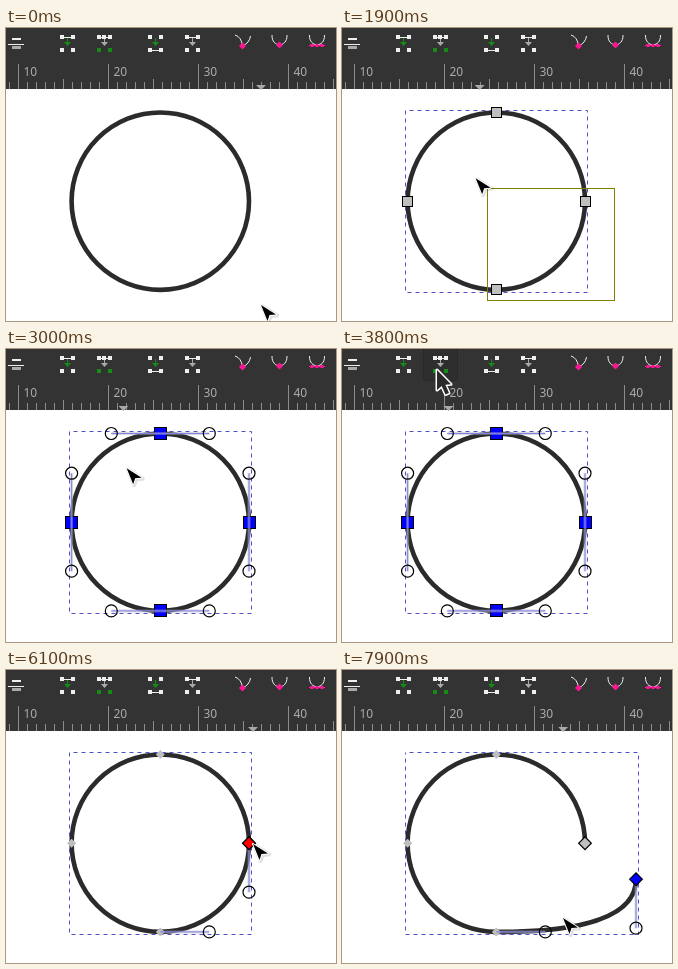
Write an HTML page with a canvas that moves like this. It is 330 px wide and 293 px high and loops after 8 s.

```html
<!DOCTYPE html>
<html lang="en">
<head>
<meta charset="utf-8">
<title>Breaking a path at a node</title>
<style>
html, body { margin: 0; width: 330px; height: 293px; overflow: hidden; background: #fff; }
canvas { display: block; }
</style>
</head>
<body>
<canvas id="stage" width="330" height="293"></canvas>
<script>
const ctx = document.getElementById('stage').getContext('2d');
const LOOP = 8000, STEP = 100, BAR = 61;
const CX = 154.3, CY = 173.2, R = 88.7, H = R * 0.5523;
const INK = '#2b2b2b', GREY = '#bfbfbf', BLUE = '#0000ff', RED = '#ff0000';
const GREEN = '#168c16', PINK = '#ff1493', PALE = '#eeeeee', DIM = '#aaaaaa';

// When each thing happens, in ms
const SELECT = 600, SHOW_NODES = 1100, BAND = 1500, BAND_END = 2800;
const BREAK = 4100, DESELECT = 5000, HOVER = 5500, GRAB = 6000, DRAG = 6200, DROP = 6900;

// Eased pointer moves: [from ms, to ms, x, y]
const HOME = [255, 277];
const moves = [
  [200, 700, 222, 231],
  [1000, 1400, 273, 272],
  [1400, 2300, 34, 63],
  [2500, 2600, 27, 66],
  [2700, 3100, 138, 129],
  [3100, 3800, 95, 20],
  [BREAK, DESELECT, 282, 155],
  [5200, HOVER, 247, 174],
  [DRAG, 6800, 298, 206],
  [6800, DROP, 298, 210],
  [DROP, 7100, 250, 185],
  [7500, 7900, 221, 248]
];

function pointerAt(t) {
  let [x, y] = HOME;
  for (const [from, to, nx, ny] of moves) {
    const k = Math.min(1, Math.max(0, (t - from) / (to - from)));
    const ease = k * k * (3 - 2 * k);
    x += (nx - x) * ease;
    y += (ny - y) * ease;
  }
  return [x, y];
}

// The loose end of the path follows the pointer while it is dragged.
function looseEnd(t) {
  const [x0, y0] = pointerAt(DRAG);
  const [x, y] = pointerAt(Math.min(DROP, Math.max(DRAG, t)));
  return [CX + R + x - x0, CY + y - y0];
}

function box(x, y, w, h, color) {
  ctx.fillStyle = color;
  ctx.fillRect(x, y, w, h);
}

function polygon(points, x, y, fill, stroke, width = 1) {
  ctx.beginPath();
  points.forEach(([px, py]) => ctx.lineTo(x + px, y + py));
  ctx.closePath();
  if (stroke) {
    ctx.strokeStyle = stroke;
    ctx.lineWidth = width;
    ctx.stroke();
  }
  if (fill) {
    ctx.fillStyle = fill;
    ctx.fill();
  }
}

function diamond(x, y, r, fill, stroke, width) {
  polygon([[0, -r], [r, 0], [0, r], [-r, 0]], x, y, fill, stroke, width);
}

function line(x0, y0, x1, y1, color, width) {
  ctx.strokeStyle = color;
  ctx.lineWidth = width;
  ctx.beginPath();
  ctx.moveTo(x0, y0);
  ctx.lineTo(x1, y1);
  ctx.stroke();
}

function squarePair(x, y, color, joined) {
  box(x - 7, y, 4, 4, color);
  box(x + 4, y, 4, 4, color);
  if (joined) box(x - 7, y + 2, 15, 1, color);
}

function pairIcon(x, bottom, arrow, topJoined, bottomJoined) {
  squarePair(x, 7, PALE, topJoined);
  squarePair(x, 20, bottom, bottomJoined);
  box(x, 10, 1, 5, arrow);
  polygon([[-3, 0], [4, 0], [0.5, 4]], x, 14, arrow);
}

function cupIcon(x, pointed) {
  ctx.strokeStyle = PALE;
  ctx.lineWidth = 1;
  ctx.beginPath();
  ctx.moveTo(x - 7.5, 7);
  if (pointed) {
    ctx.quadraticCurveTo(x - 1, 9, x, 18);
    ctx.quadraticCurveTo(x + 7, 15, x + 8, 8);
  } else {
    ctx.bezierCurveTo(x - 8, 20, x + 8, 20, x + 7.5, 7);
  }
  ctx.stroke();
}

function drawIcons() {
  box(6, 10, 9, 2, PALE);
  box(2, 16, 16, 1, PALE);
  box(6, 18, 9, 3, DIM);

  pairIcon(61, PALE, GREEN, true, false);
  pairIcon(98, GREEN, DIM, true, false);
  box(96, 7, 4, 4, PALE);
  pairIcon(149, PALE, GREEN, false, true);
  pairIcon(186, PALE, DIM, true, false);

  cupIcon(236.5, true);
  diamond(236.5, 18, 3.5, PINK);
  cupIcon(273.5);
  diamond(273.5, 17, 3.5, PINK);
  cupIcon(311);
  box(303, 17, 16, 1, PINK);
  for (let i = -1; i <= 1; i++) box(309.5 + i * 5, 16, 3, 3, PINK);
}

function drawRuler(markerX) {
  ctx.font = '12px "Noto Sans", sans-serif';
  for (let i = -1; i < 36; i++) {
    const x = 12 + i * 9;
    const top = i % 10 === 0 ? 36 : i % 5 === 0 ? 51 : 54;
    box(x, top, 1, BAR - top, '#8c8c8c');
    if (i % 10 === 0) {
      ctx.fillStyle = '#acacac';
      ctx.fillText(String(10 + i), x + 5.5, 48);
    }
  }
  polygon([[-5, 0], [5, 0], [0, 5]], markerX, 57, '#a8a8a8');
}

function drawToolbar(overBar, markerX) {
  box(0, 0, 330, BAR, '#333333');
  if (overBar) {
    ctx.beginPath();
    ctx.roundRect(81.5, -3.5, 34, 35, 3);
    ctx.fillStyle = '#2e2e2e';
    ctx.fill();
    ctx.strokeStyle = '#282828';
    ctx.lineWidth = 1;
    ctx.stroke();
  }
  drawIcons();
  drawRuler(markerX);
}

function drawPath([ex, ey]) {
  ctx.strokeStyle = INK;
  ctx.lineWidth = 4.6;
  ctx.beginPath();
  ctx.arc(CX, CY, R, 0, Math.PI / 2, true);
  ctx.bezierCurveTo(CX + H, CY + R, ex, ey + H, ex, ey);
  ctx.stroke();
}

function drawBounds(endX) {
  ctx.strokeStyle = '#5050c8';
  ctx.lineWidth = 1;
  ctx.setLineDash([4, 4]);
  ctx.lineDashOffset = 4;
  const right = Math.round(endX + 2) + 0.5;
  ctx.strokeRect(63.5, 82.5, right - 63.5, 182);
  ctx.setLineDash([]);
}

function squareNode(x, y, fill) {
  const r = fill === BLUE ? 6 : 5;
  const left = Math.floor(x) - r, top = Math.floor(y) - r;
  box(left, top, 2 * r + 1, 2 * r + 1, '#000');
  box(left + 1, top + 1, 2 * r - 1, 2 * r - 1, fill);
}

function diamondNode(x, y, fill, outlined) {
  diamond(x, y, outlined ? 5.5 : 4.5, fill, outlined && '#000', 2.4);
}

function handle(x, y, hx, hy) {
  line(x, y, hx, hy, 'rgba(170,170,170,.45)', 3);
  line(x, y, hx, hy, '#8080f0', 1);
  ctx.strokeStyle = '#000';
  ctx.lineWidth = 1.2;
  ctx.beginPath();
  ctx.arc(hx, hy, 6, 0, 7);
  ctx.stroke();
}

function drawNodes(t, [ex, ey]) {
  const selected = t >= BAND_END && t < DESELECT;
  const fill = selected ? BLUE : GREY;
  for (let i = 0; i < 4; i++) {
    const c = Math.round(Math.cos(i * Math.PI / 2)), s = Math.round(Math.sin(i * Math.PI / 2));
    const x = CX + R * c, y = CY + R * s;
    if (t < BREAK) squareNode(x, y, fill);
    else diamondNode(x, y, fill, selected || (i === 0 && t >= HOVER));
    if (selected) {
      handle(x, y, x + H * s, y + H * c);
      handle(x, y, x - H * s, y - H * c);
    }
  }
  if (t >= GRAB) {
    handle(CX, CY + R, CX + H, CY + R);
    handle(ex, ey, ex, ey + H);
  }
  if (t >= HOVER) diamondNode(ex, ey, t <= DROP ? RED : BLUE, true);
}

function drawRubberband(t) {
  const [x, y] = pointerAt(t - 28).map(Math.round);
  ctx.strokeStyle = '#808000';
  ctx.lineWidth = 1;
  ctx.strokeRect(x + 0.5, y + 0.5, 272 - x, 272 - y);
}

function drawPointer(x, y, overBar) {
  ctx.lineJoin = 'round';
  if (overBar) {
    const arrow = [[0, 0], [0, 20], [4.7, 16], [8.5, 24.5], [12, 23], [8.4, 14.8], [14, 14.3]];
    polygon(arrow, x, y + 1, '#2a2a2a', '#fff', 3);
  } else {
    const arrow = [[0, 0], [15, 9.5], [8.5, 10], [6.5, 16]];
    polygon(arrow, x + 1, y + 1, null, 'rgba(0,0,0,.12)', 4);
    polygon(arrow, x, y, '#000', '#fff', 2);
  }
  ctx.lineJoin = 'miter';
}

function draw(t) {
  const [x, y] = pointerAt(t);
  const end = looseEnd(t);
  const overBar = y < BAR;

  box(0, 0, 330, 293, '#fff');
  drawPath(end);
  if (t >= SELECT) drawBounds(end[0]);
  if (t >= SHOW_NODES) drawNodes(t, end);
  if (t >= BAND && t < BAND_END) drawRubberband(t);
  drawToolbar(overBar, overBar ? 106.5 : pointerAt(t - 10)[0]);
  drawPointer(x, y, overBar);
}

const start = performance.now();
function tick() {
  const t = (performance.now() - start) % LOOP;
  draw(Math.floor(t / STEP) * STEP);
  requestAnimationFrame(tick);
}
tick();
</script>
</body>
</html>
```
